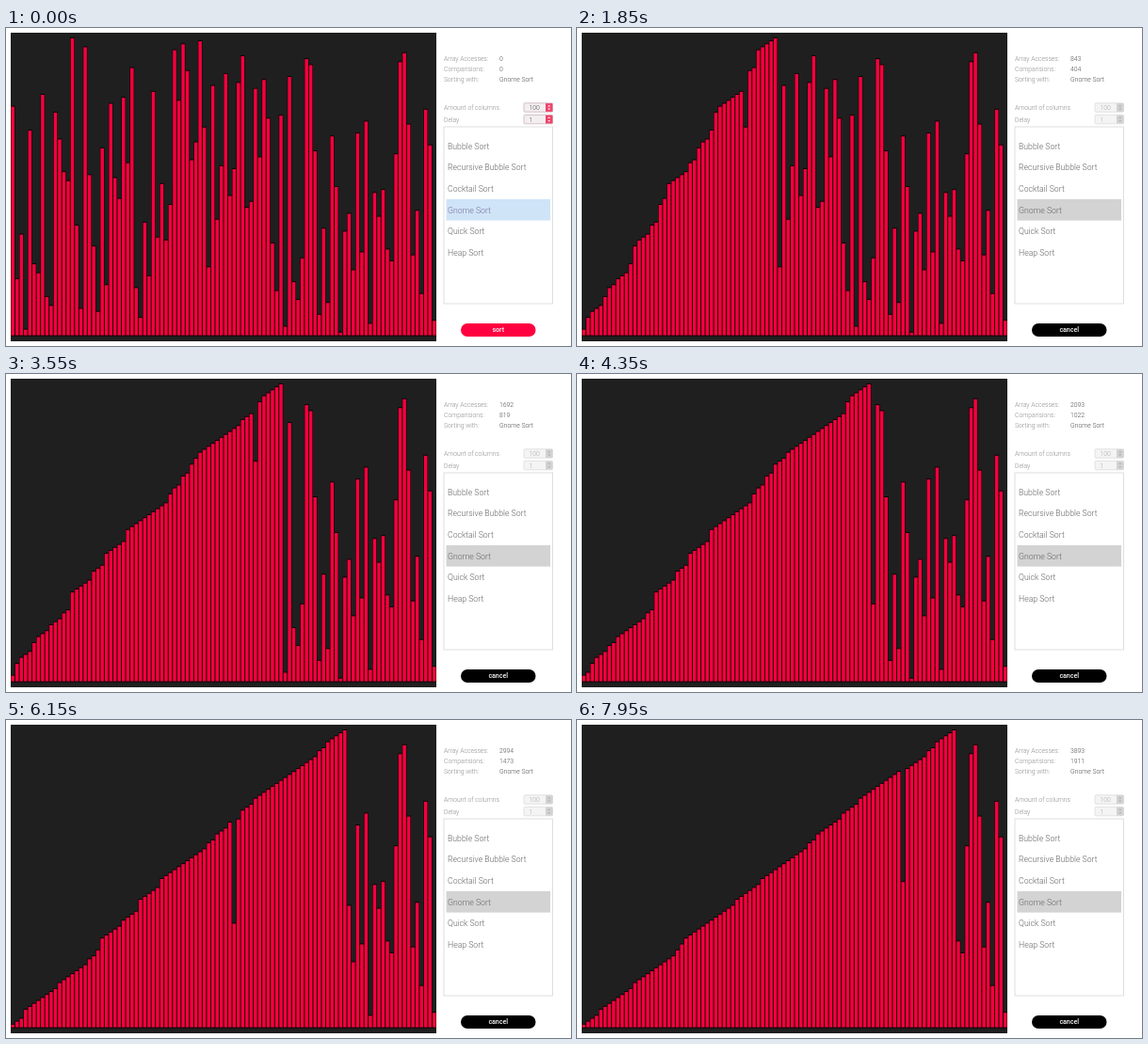
Write an HTML page with a canvas that moves like this. It is 600 by 338 pixels and loops after 8 s.

```html
<!DOCTYPE html>
<html lang="en">
<head>
<meta charset="utf-8">
<title>Gnome Sort</title>
<style>
  html, body { margin: 0; width: 100%; height: 100%; overflow: hidden; background: #fff; }
  canvas, svg { position: absolute; left: 0; top: 0; width: 600px; height: 338px; }
  text { font-family: Roboto, sans-serif; font-weight: 300; font-size: 6.8px; fill: #8c8c8c; }
  .value { fill: #4a4a4a; }
  .item { font-size: 8.7px; fill: #666; }
  .box { fill: #fff; stroke: #dedede; }
  .row { fill: #d3d3d3; }
  .field { fill: #f4f4f4; stroke: #dcdcdc; stroke-width: .8; }
  .arrows { fill: #d2d2d2; }
  .marks { fill: #aaa; }
  .number { fill: #aaa; }
  .button { fill: #000; }
  .action { fill: #fff; font-size: 7px; font-weight: 500; text-anchor: middle; }
  .idle .row { fill: #cfe4f7; }
  .idle .selected { fill: #7d6f9c; }
  .idle .field { fill: #f3eef0; stroke: #c9b4ba; }
  .idle .arrows { fill: #f0436c; }
  .idle .marks { fill: #fff; }
  .idle .number { fill: #555; }
  .idle .button { fill: #ff0040; }
</style>
</head>
<body>
<canvas width="600" height="338"></canvas>
<svg id="panel" viewBox="0 0 600 338"></svg>
<script>
const LOOP = 8000, TICK = 50, START = 50;
const VALUES = [
  77, 19, 34, 2, 69, 24, 21, 81, 13, 10, 75, 66, 55, 52, 100, 37, 9, 97, 54, 30,
  8, 63, 17, 78, 53, 46, 80, 58, 90, 16, 6, 38, 20, 82, 33, 51, 32, 44, 96, 79,
  98, 89, 59, 65, 99, 70, 23, 84, 39, 57, 88, 47, 56, 85, 94, 43, 45, 83, 60, 86,
  73, 31, 15, 74, 3, 87, 18, 12, 26, 93, 91, 62, 7, 36, 11, 67, 50, 1, 35, 41,
  22, 68, 28, 72, 4, 48, 40, 49, 29, 25, 61, 92, 95, 71, 27, 42, 14, 76, 64, 5
];
// [time in ms, array accesses]
const PACE = [[0, 0], [50, 0], [250, 40], [1050, 445], [2700, 1266], [4350, 2093],
  [5400, 2619], [6150, 2994], [7950, 3893]];

const panel = document.getElementById('panel');
const ctx = document.querySelector('canvas').getContext('2d');

function add(tag, attrs, content = '') {
  const node = document.createElementNS('http://www.w3.org/2000/svg', tag);
  for (const name in attrs) node.setAttribute(name, attrs[name]);
  node.textContent = content;
  return panel.appendChild(node);
}
const label = (x, y, content, cls = '') => add('text', { x, y, class: cls }, content);
const rect = (x, y, width, height, cls, rx = 0) =>
  add('rect', { x, y, width, height, rx, class: cls });

function spinner(y, value) {
  rect(550, y, 30.5, 9.4, 'field', 1);
  rect(573, y + .3, 7.4, 8.8, 'arrows');
  add('path', { class: 'marks', d: `M575.3 ${y + 3.6}l1.4-1.6 1.4 1.6zm0 2.2l1.4 1.6 1.4-1.6z` });
  label(555.5, y + 7.1, value, 'number');
}

label(465, 35, 'Array Accesses:');
label(465, 46, 'Comparisions:');
label(465, 56.7, 'Sorting with:');
const accessText = label(524, 35, '0', 'value');
const compareText = label(524, 46, '0', 'value');
label(524, 56.7, 'Gnome Sort', 'value');
label(465, 87, 'Amount of columns');
label(465, 99.6, 'Delay');
spinner(79.8, '100');
spinner(92.4, '1');

rect(465, 105, 115.5, 188, 'box');
rect(467.5, 182, 110.5, 22.6, 'row');
['Bubble Sort', 'Recursive Bubble Sort', 'Cocktail Sort', 'Gnome Sort', 'Quick Sort', 'Heap Sort']
  .forEach((name, i) => label(469, 128.7 + i * 22.65, name, i === 3 ? 'item selected' : 'item'));

rect(483, 314, 79.5, 14, 'button', 7);
const actionText = label(522.7, 323.3, 'sort', 'action');

function accessesAt(time) {
  const next = Math.max(1, PACE.findIndex(([t]) => t >= time));
  const [t0, n0] = PACE[next - 1], [t1, n1] = PACE[next];
  return Math.round(n0 + (n1 - n0) * (time - t0) / (t1 - t0));
}

function gnomeSort(limit) {
  const bars = VALUES.slice();
  let swaps = 0, i = 1;
  for (let n = 0; n < limit && i < bars.length; n++) {
    if (bars[i - 1] <= bars[i]) { i++; continue; }
    [bars[i - 1], bars[i]] = [bars[i], bars[i - 1]];
    swaps++;
    i = Math.max(1, i - 1);
  }
  return { bars, swaps };
}

function drawBars(bars) {
  const base = 327, step = 4.52;
  ctx.fillStyle = '#1f1f1f';
  ctx.fillRect(5, 5, 452, 328);
  bars.forEach((value, i) => {
    const x = 5 + i * step, height = value * 3.16;
    ctx.fillStyle = '#0c0205';
    ctx.fillRect(x, base - height - 1, step, height + 1.6);
    ctx.fillStyle = '#f5003d';
    ctx.fillRect(x + .5, base - height, step - 1, height - .4);
  });
}

let shown = -1;
function render(now) {
  const time = Math.floor(now % LOOP / TICK) * TICK;
  if (time !== shown) {
    shown = time;
    const accesses = accessesAt(time), { bars, swaps } = gnomeSort(accesses);
    const idle = time < START;
    panel.setAttribute('class', idle ? 'idle' : '');
    actionText.textContent = idle ? 'sort' : 'cancel';
    accessText.textContent = accesses;
    compareText.textContent = swaps;
    drawBars(bars);
  }
}

const origin = performance.now();
function loop() {
  render(performance.now() - origin);
  requestAnimationFrame(loop);
}
loop();
</script>
</body>
</html>
```
